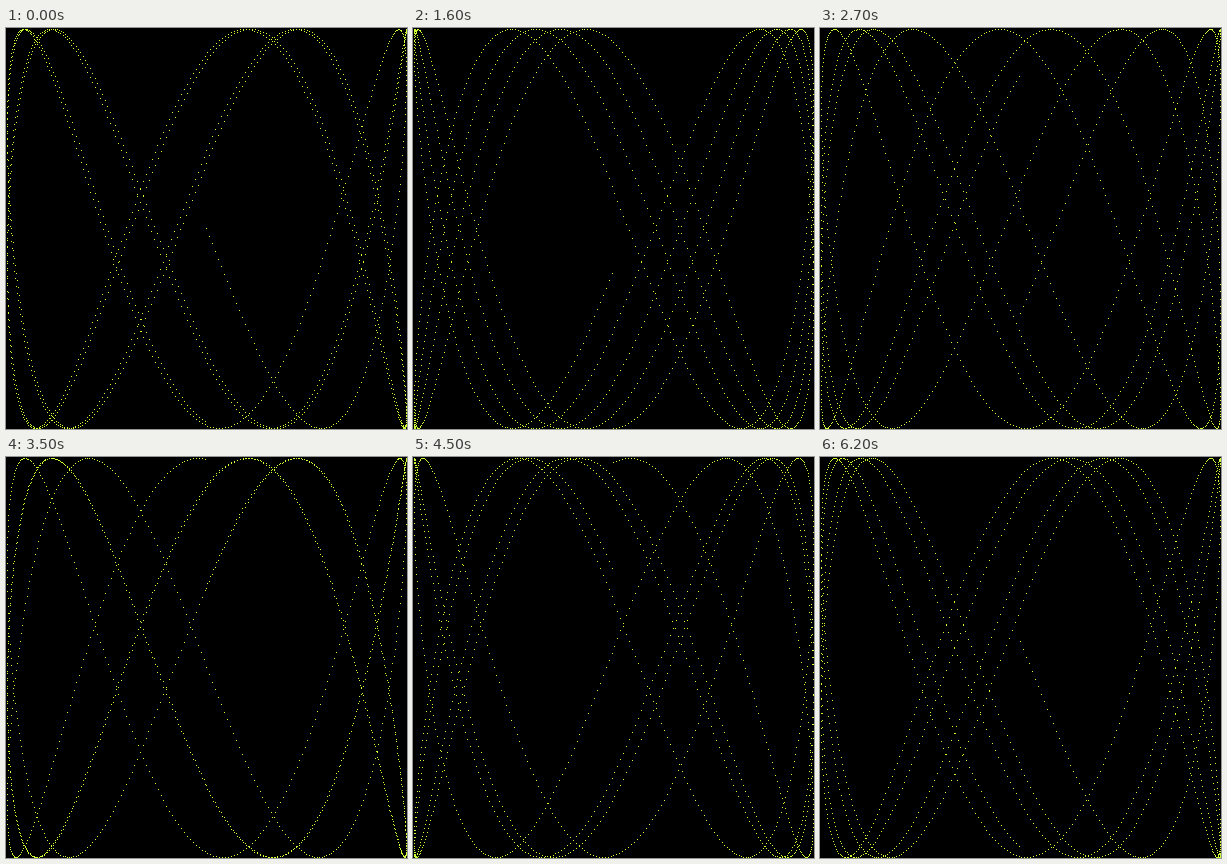
Write an HTML page with a canvas that moves like this. It is 401 px wide and 401 px high and loops after 6300 ms.

```html
<!DOCTYPE html>
<html>
<head>
<meta charset="utf-8">
<style>
html, body { margin: 0; width: 100%; height: 100%; overflow: hidden; background: #000; }
canvas { display: block; }
</style>
</head>
<body>
<canvas id="stage" width="401" height="401"></canvas>
<script>
const ctx = document.getElementById('stage').getContext('2d');
const SIZE = 200, CYCLES = 4, STEP = 0.015, FREQ = 2.5531;
const DELAY = 100, POSES = 63;
const toPixel = v => SIZE + Math.trunc(v * SIZE + 0.5);

function draw(phase) {
  ctx.fillStyle = '#000';
  ctx.fillRect(0, 0, 401, 401);
  ctx.fillStyle = '#cf3';
  for (let t = 0; t < CYCLES * 2 * Math.PI; t += STEP) {
    ctx.fillRect(toPixel(Math.sin(t)), toPixel(Math.sin(t * FREQ + phase)), 1, 1);
  }
}

const start = performance.now();
let shown = -1;
function tick() {
  const pose = Math.floor((performance.now() - start) / DELAY) % POSES;
  if (pose !== shown) draw((shown = pose) * 0.1);
  requestAnimationFrame(tick);
}
tick();
</script>
</body>
</html>
```
